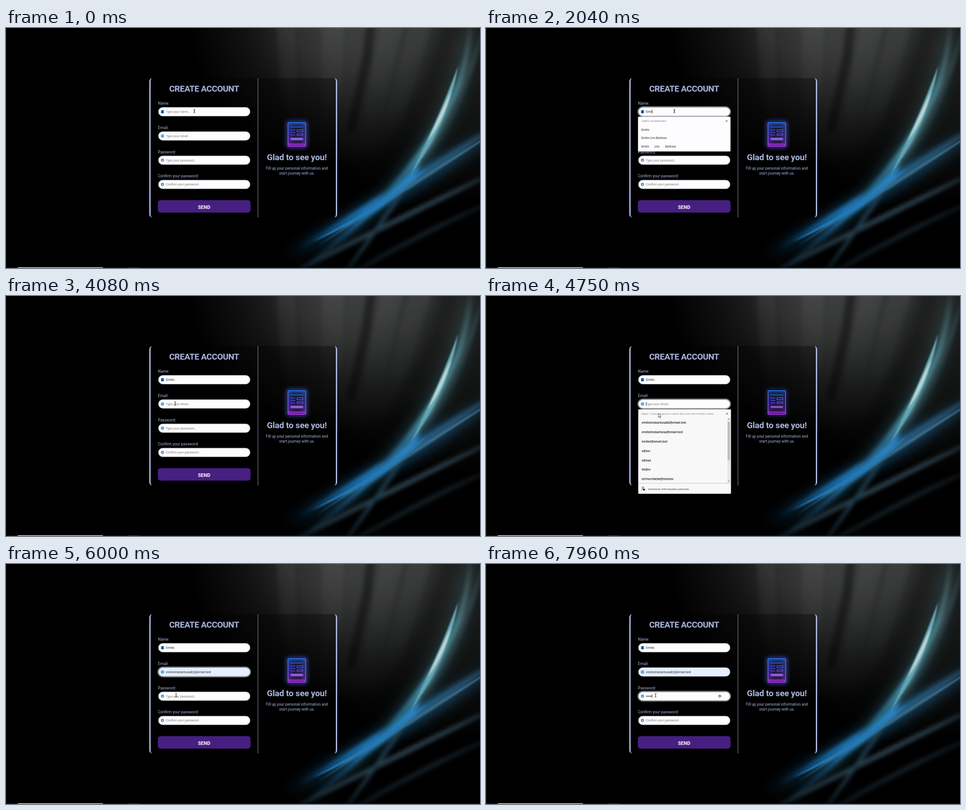
An HTML page that plays this animation: 1052x532 px, repeating every 8 s.

```html
<!DOCTYPE html>
<html lang="en">
<head>
<meta charset="utf-8">
<title>Create account</title>
<style>
  html, body { margin: 0; width: 100%; height: 100%; overflow: hidden; background: #000; }
  svg { position: absolute; left: 0; top: 0; width: 1052px; height: 532px; }
  filter { color-interpolation-filters: sRGB; }
  .card { position: absolute; left: 318px; top: 111px; width: 417px; height: 309px; box-sizing: border-box;
    border: 0 solid #a9b5df; border-width: 0 3px; border-radius: 7px; background: rgba(0, 0, 0, .35); }
  text { font-family: Roboto, "Open Sans", sans-serif; white-space: pre; }
  .ui { font-family: "Open Sans", "Noto Sans", sans-serif; }
</style>
</head>
<body>
<svg viewBox="0 0 1052 532">
  <defs>
    <filter id="b2" filterUnits="userSpaceOnUse" x="-80" y="-80" width="1212" height="692"><feGaussianBlur stdDeviation="1.8"/></filter>
    <filter id="b5" filterUnits="userSpaceOnUse" x="-80" y="-80" width="1212" height="692"><feGaussianBlur stdDeviation="5"/></filter>
    <filter id="b14" filterUnits="userSpaceOnUse" x="-80" y="-80" width="1212" height="692"><feGaussianBlur stdDeviation="14"/></filter>
    <radialGradient id="haze" gradientUnits="userSpaceOnUse" cx="730" cy="-30" r="330">
      <stop offset="0" stop-color="#333"/><stop offset=".3" stop-color="#282828"/>
      <stop offset=".65" stop-color="#101010"/><stop offset="1" stop-color="#000"/>
    </radialGradient>
    <radialGradient id="side" gradientUnits="userSpaceOnUse" cx="960" cy="20" r="380">
      <stop offset="0" stop-color="#222423"/><stop offset=".5" stop-color="#121413"/><stop offset="1" stop-color="#000"/>
    </radialGradient>
    <linearGradient id="ray" gradientUnits="userSpaceOnUse" x1="0" y1="0" x2="0" y2="230">
      <stop offset="0" stop-color="#999" stop-opacity=".1"/><stop offset="1" stop-color="#999" stop-opacity="0"/>
    </linearGradient>
    <linearGradient id="arc" gradientUnits="userSpaceOnUse" x1="1010" y1="0" x2="690" y2="532">
      <stop offset="0" stop-color="#2a3436"/><stop offset=".25" stop-color="#37808e"/>
      <stop offset=".4" stop-color="#4f9aac"/><stop offset=".55" stop-color="#24607e"/>
      <stop offset=".75" stop-color="#1f6296"/><stop offset="1" stop-color="#0a2436"/>
    </linearGradient>
    <linearGradient id="band" gradientUnits="userSpaceOnUse" x1="1052" y1="235" x2="670" y2="475">
      <stop offset="0" stop-color="#1b3d55"/><stop offset=".3" stop-color="#1d5278"/>
      <stop offset=".5" stop-color="#2580c0"/><stop offset=".75" stop-color="#1868a4"/><stop offset="1" stop-color="#0b3a60"/>
    </linearGradient>
    <linearGradient id="neon" gradientUnits="userSpaceOnUse" x1="0" y1="209" x2="0" y2="263">
      <stop offset="0" stop-color="#1c74ea"/><stop offset=".45" stop-color="#5a4be6"/><stop offset="1" stop-color="#b92fe6"/>
    </linearGradient>
  </defs>
  <rect width="1052" height="532"/>
  <g style="mix-blend-mode:screen"><rect width="1052" height="532" fill="url(#haze)"/></g>
  <g style="mix-blend-mode:screen"><rect width="1052" height="532" fill="url(#side)"/></g>
  <g id="rays" filter="url(#b5)" fill="url(#ray)"></g>
  <path d="M812-20L800 70 765 230" fill="none" stroke="#000" stroke-opacity=".4" stroke-width="20" filter="url(#b5)"/>
  <path d="M985-20C960 100 900 220 800 350" fill="none" stroke="#000" stroke-opacity=".4" stroke-width="26" filter="url(#b14)"/>
  <g style="mix-blend-mode:screen">
    <g id="wide" filter="url(#b14)"></g>
    <g id="soft" filter="url(#b5)"></g>
    <g id="fine" filter="url(#b2)"></g>
  </g>
  <path d="M.5 0V532" stroke="#0c1a10"/>
  <path d="M0 531.5H1052" stroke="#14251d"/>
  <path d="M26 531.3H215" stroke="#d8dde0" stroke-width="1.4"/>
  <path d="M270 531.5H296" stroke="#4a5652"/>
</svg>
<div class="card"></div>
<svg viewBox="0 0 1052 532" id="stage"></svg>
<script>
const LOOP = 8000, STEP = 53.75, INK = '#a9b5df';
const NAME = 'Emílio', MAIL = 'emiliolinsbarbosa82@email.test';
const stage = document.getElementById('stage');

function add(parent, tag, attrs, content) {
  const el = document.createElementNS('http://www.w3.org/2000/svg', tag);
  for (const k in attrs) el.setAttribute(k, attrs[k]);
  if (content) el.textContent = content;
  parent.appendChild(el);
  return el;
}
const group = (parent = stage) => add(parent, 'g', {});
const rect = (p, x, y, width, height, rx, fill, more) => add(p, 'rect', { x, y, width, height, rx, fill, ...more });
const line = (p, d, stroke, w = 1, more) => add(p, 'path', { d, stroke, fill: 'none', 'stroke-width': w, ...more });
const label = (p, x, y, size, fill, str, more) => add(p, 'text', { x, y, 'font-size': size, fill, ...more }, str);
const ui = (p, x, y, size, fill, str, more) => label(p, x, y, size, fill, str, { class: 'ui', ...more });
const show = (el, on) => { el.style.display = on ? '' : 'none'; };

// soft light rays: top x, width, lean
for (const [x, w, lean] of [[600, 40, 8], [700, 50, -8], [835, 50, -60], [900, 50, -80]])
  add(document.getElementById('rays'), 'path', { d: `M${x}-20h${w}l${lean} 260h${-w * .8}Z` });

// streaks taper at both ends: start, point passed halfway, end, width
function streak(layer, x0, y0, mx, my, x1, y1, w, fill) {
  const cx = 2 * mx - (x0 + x1) / 2, cy = 2 * my - (y0 + y1) / 2;
  const len = Math.hypot(x1 - x0, y1 - y0), dx = (y1 - y0) / len * w, dy = (x0 - x1) / len * w;
  add(document.getElementById(layer), 'path',
    { fill, d: `M${x0} ${y0}Q${cx + dx} ${cy + dy} ${x1} ${y1}Q${cx - dx} ${cy - dy} ${x0} ${y0}Z` });
}
streak('wide', 1100, 215, 890, 350, 620, 505, 34, '#0e3a5a');
streak('wide', 1030, -30, 940, 255, 650, 540, 28, '#15404c');
streak('soft', 1100, 208, 890, 345, 650, 488, 19, 'url(#band)');
streak('soft', 1030, -30, 938, 255, 650, 540, 15, 'url(#arc)');
streak('soft', 1100, 312, 880, 420, 620, 550, 11, '#2b404c');
streak('soft', 1090, 380, 925, 458, 740, 560, 10, '#142026');
streak('soft', 1060, 0, 992, 180, 895, 340, 12, '#1d3036');
streak('soft', 915, 300, 850, 405, 740, 560, 10, '#1e3c4c');
streak('soft', 920, 295, 872, 358, 760, 445, 13, '#2b86c8');
streak('fine', 1100, 222, 905, 345, 690, 484, 7, '#33627e');
streak('fine', 935, 308, 828, 392, 680, 474, 9, '#2178b4');
streak('fine', 1003, 85, 962, 203, 898, 325, 12, '#5c9fac');
streak('fine', 988, 140, 964, 198, 936, 250, 8, '#b4cfd0');

// static card content
const mid = { 'text-anchor': 'middle', 'font-weight': 700 };
line(stage, 'M559.2 111V420', '#8f98b4', 1);
label(stage, 439.7, 140.8, 19, INK, 'CREATE ACCOUNT', { ...mid, 'letter-spacing': -.5 });
label(stage, 645.5, 293, 19, INK, 'Glad to see you!', { ...mid, 'letter-spacing': -.2 });
label(stage, 645.7, 314, 8.5, INK, 'Fill up your personal information and', { 'text-anchor': 'middle' });
label(stage, 645.7, 325, 8.5, INK, 'start journey with us.', { 'text-anchor': 'middle' });
rect(stage, 337, 381.6, 205.8, 27.6, 6, '#471f80');
label(stage, 439.7, 400.6, 10.9, '#fff', 'SEND', mid);

// neon document
const sheet = 'M628 210H663Q665 210 665 212V260Q665 262 663 262H628Q626 262 626 260V212Q626 210 628 210Z';
const marks = 'M632 219.5H659M632 226H642M632 231.5H642M632 237H642M646 225.5H658.5V230H646ZM646 234.5H658.5V238H646Z';
const glow = group();
line(glow, sheet, '#4a58c8', 8, { filter: 'url(#b5)', 'stroke-opacity': .7 });
line(glow, 'M632 246H659', '#a77cff', 5, { filter: 'url(#b2)' });
add(stage, 'path', { d: sheet, fill: 'url(#neon)', 'fill-opacity': .25 });
line(stage, sheet + 'M626 257.5H665', 'url(#neon)', 2);
line(stage, marks, 'url(#neon)', 1.6);
line(stage, 'M632 246H659', '#9d6cf5', 2);

// form fields
const icons = [
  (g, y) => { rect(g, 344, y - 3.5, 6.6, 7, 1, '#1878cf');
    add(g, 'circle', { cx: 347.3, cy: y - 1, r: 1.3, fill: '#0b2c55' });
    line(g, `M345.3 ${y + 2.2}h4`, '#0b2c55', 1.4); },
  (g, y) => { rect(g, 344, y - 3.3, 6.6, 6.6, 1.6, '#2488dc');
    line(g, `M345.6 ${y - 1.4}h3.4v2.8h-3.4zl1.7 1.6 1.7-1.6`, '#d5ebfb', .6); },
  (g, y) => { add(g, 'circle', { cx: 347.3, cy: y, r: 3.4, fill: '#3489d4' });
    rect(g, 345.9, y - .4, 2.8, 2, .4, '#d5ebfb');
    line(g, `M346.4 ${y - .4}v-.7q.9-1.4 1.8 0v.7`, '#d5ebfb', .6); }
];
const fields = [
  ['Name:', 'Type your name...'], ['Email:', 'Type your email...'],
  ['Password:', 'Type your password...'], ['Confirm your password:', 'Confirm your password...']
].map(([title, hint], i) => {
  const y = 185.5 + i * STEP;
  label(stage, 337.3, y - 15.5, 8.55, INK, title);
  const ring = group();
  rect(ring, 336.7, y - 11.1, 206.4, 22.2, 11.1, '#0c0c0c', { stroke: '#e9e9ee', 'stroke-width': .9 });
  const box = rect(stage, 338.1, y - 9.8, 203.8, 19.7, 9.8, '#fdfdff', { stroke: '#77777c', 'stroke-width': .9 });
  icons[Math.min(i, 2)](stage, y);
  return {
    y, ring, box, hint: label(stage, 354.8, y + 2.5, 7, '#7a7a7a', hint),
    text: label(stage, 354.8, y + 2.5, 7, '#2c2c2c'),
    caret: rect(stage, 0, y - 4, .8, 8, 0, '#111')
  };
});
const preview = ui(stage, 354.8, fields[1].y + 2.4, 6.8, '#111', MAIL);
const dots = group(), dot = [];
for (let i = 0; i < 6; i++) dot.push(add(dots, 'circle', { cx: 356 + i * 2.2, cy: 293, r: .95, fill: '#222' }));
const eye = group();
line(eye, 'M514.6 293.6Q518.8 287.8 523 293.6', '#333', 1);
add(eye, 'circle', { cx: 518.8, cy: 293.8, r: 1.7, fill: 'none', stroke: '#333', 'stroke-width': 1 });

// stored values below the name field
const cross = (g, x, y) => line(g, `M${x - 2.3} ${y - 2.3}l4.6 4.6m0-4.6l-4.6 4.6`, '#333', .8);
function nameList(items) {
  const g = group();
  rect(g, 337.5, 196.8, 205, 20.7 + items.length * 18.67, 1, '#fdfdff', { stroke: '#c8c8cc', 'stroke-width': .5 });
  ui(g, 345.8, 208.2, 5.7, '#666', 'Dados armazenados');
  cross(g, 534, 206.2);
  items.forEach((s, i) => ui(g, 344.6, 227.5 + i * 18.67, 6.2, '#111', s));
  return g;
}
const FULL = NAME + ' Lins Barbosa';
const lists = [
  nameList([NAME, 'eduardolinsbarbosa82@example.com', '@eduardolinsba', FULL, 'eduardooficinas@example.com', 'ebentru']),
  nameList([NAME, 'eduardolinsbarbosa82@example.com', FULL, 'eduardooficinas@example.com', 'ebentru']),
  nameList([NAME, FULL, NAME + '       Lins        Barbosa'])
];

// stored addresses below the email field
const mails = group();
rect(mails, 338, 251.3, 205.6, 187, 1.5, '#f8f8f8', { stroke: '#aaa', 'stroke-width': .6 });
ui(mails, 345, 263.2, 5.7, '#777', "Digite '/' para pesquisar a partir das suas informações salvas");
cross(mails, 535, 261);
const hover = rect(mails, 340.5, 270.8, 191.5, 20.6, 0, '#c9dfed', { stroke: '#5f9fcc', 'stroke-width': .8 });
[MAIL, 'emiliolinsbarbosa@email.test', 'emiliol@email.test', 'e@evr', 'e@eee', 'ttt@nr', 'elrlrkvrhtktlk@tshlvhlv']
  .forEach((s, i) => ui(mails, 345.6, 283.2 + i * 20.85, 6.4, '#111', s, { 'font-weight': 600 }));
rect(mails, 536, 270, 6, 144, 0, '#e6e6e6');
rect(mails, 536.3, 279, 5.4, 85, 0, '#bdbdbd');
line(mails, 'M537 274l2-2 2 2M537 409l2 2 2-2', '#555', .9);
line(mails, 'M338 415H543.6', '#b5b5b5', .8);
add(mails, 'circle', { cx: 348.3, cy: 425, r: 1.9, fill: 'none', stroke: '#222', 'stroke-width': .9 });
line(mails, 'M345.3 431q0-3 3-3', '#222', .9);
rect(mails, 348.8, 427.5, 4.2, 3.6, .5, '#222');
ui(mails, 359.6, 429.5, 6.1, '#222', 'Gerenciar informações pessoais');

// pointer
const press = add(stage, 'circle', { fill: '#e8474a', stroke: '#d8282c', 'stroke-width': .8 });
const beam = group(), arrow = group();
line(beam, 'M-1.8-4Q0-4 0-3V3Q0 4-1.8 4M1.8-4Q0-4 0-3V3Q0 4 1.8 4', '#1c1c1c', .9);
add(arrow, 'path', { d: 'M0 0V9.2L2.1 7.3 3.6 10.6 5 10 3.6 6.8H6.5Z', fill: '#fff', stroke: '#111', 'stroke-width': .7 });

const path = [
  [0, 418, 184], [2990, 418, 184], [3450, 273, 176], [3640, 273, 176], [4080, 375.5, 238.5],
  [4520, 375.5, 238.5], [4950, 388, 277], [5400, 388, 277], [5900, 377.5, 291], [6500, 377.5, 291], [6800, 376.5, 291]
];
const presses = [250, 2880, 3510, 4340, 5170, 6140];
const nameKeys = [1450, 1700, 1880, 2040, 2200, 2350];
const dotKeys = [6900, 7150, 7400, 7680, 7780, 7900];

const count = (keys, t) => keys.filter(k => t >= k).length;
const clamp = v => Math.max(0, Math.min(1, v));

function pointer(t) {
  const i = path.findIndex(p => p[0] > t);
  if (i < 0) return path[path.length - 1].slice(1);
  const [t0, x0, y0] = path[i - 1], [t1, x1, y1] = path[i];
  const p = (t - t0) / (t1 - t0), e = p * p * (3 - 2 * p);
  return [x0 + (x1 - x0) * e, y0 + (y1 - y0) * e];
}

function render(t) {
  glow.style.opacity = .72 + .28 * Math.cos(t * Math.PI / 1000);

  const typed = count(nameKeys, t), hidden = count(dotKeys, t);
  const focus = t >= 330 && t < 3560 ? 0 : t >= 4400 && t < 6200 ? 1 : t >= 6200 ? 2 : -1;
  const [x, y] = pointer(t);
  const opacity = t < 5280 ? clamp((t - 4420) / 120) : t < 5380 ? .84 : .84 * clamp((5480 - t) / 100);
  const hovered = t < 5400 && y > 270 && t > 4520;
  const filled = t >= 5400;

  const values = [NAME.slice(0, typed), filled ? MAIL : '', '', ''];
  const empty = [!typed, !filled && !hovered, !hidden, true];
  const since = [typed ? nameKeys[typed - 1] : 330, filled ? 5400 : 4400, hidden ? dotKeys[hidden - 1] : 6200][focus];
  fields.forEach((f, i) => {
    f.text.textContent = values[i];
    show(f.hint, empty[i]);
    show(f.ring, i === focus);
    show(f.caret, i === focus && !(i === 1 && hovered) && (t - since) % 1000 < 500);
    const end = i === 2 ? hidden * 2.2 : values[i] ? f.text.getComputedTextLength() : 0;
    f.caret.setAttribute('x', 354.9 + end);
  });
  fields[1].box.setAttribute('fill', hovered || filled ? '#e6effd' : '#fdfdff');
  show(preview, hovered);
  dot.forEach((d, i) => show(d, i < hidden));
  show(eye, hidden > 0);

  const open = t >= 420 && t < 2970 ? Math.min(typed, 2) : -1;
  lists.forEach((g, i) => show(g, i === open));
  mails.style.opacity = opacity;
  show(mails, opacity > 0);
  show(hover, hovered);

  const over = fields.some(f => Math.abs(y - f.y) < 9.8) && x > 338 && x < 542 && !(opacity > 0 && y > 251);
  show(beam, over);
  show(arrow, !over);
  (over ? beam : arrow).setAttribute('transform', `translate(${x} ${y})`);

  const last = presses.filter(p => p <= t).pop(), age = t - last;
  show(press, age < 330);
  if (age < 330) {
    const grow = clamp(age / 110), fade = clamp((330 - age) / 110);
    press.setAttribute('cx', x);
    press.setAttribute('cy', y);
    press.setAttribute('r', 2 + 5 * grow);
    press.setAttribute('fill-opacity', .75 * grow * fade);
    press.setAttribute('stroke-opacity', .85 * fade);
  }
}

const start = performance.now();
function tick() {
  render((performance.now() - start) % LOOP);
  requestAnimationFrame(tick);
}
tick();
</script>
</body>
</html>
```
